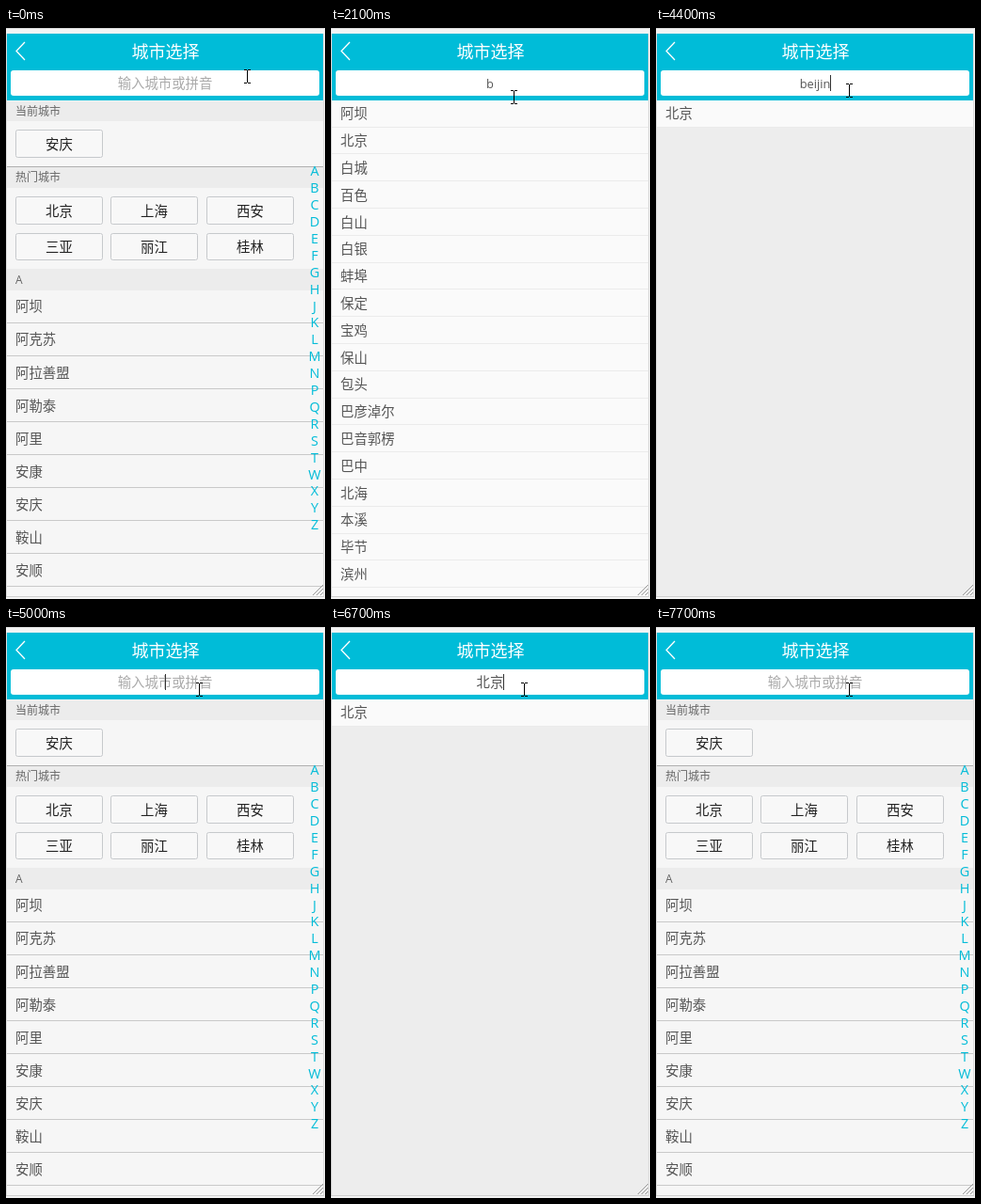
Animation, 339 px wide and 607 px high, one loop 8000 ms. Source, as an HTML page:

```html
<!DOCTYPE html>
<html lang="zh-CN">
<head>
<meta charset="utf-8">
<title>城市选择</title>
<style>
html, body { margin: 0; width: 100%; height: 100%; overflow: hidden; background: #f4f4f4; }
svg { display: block; width: 339px; height: 607px; }
text { font-family: "Open Sans", "Noto Sans CJK SC", "Noto Sans CJK", sans-serif; white-space: pre; }
.pinyin { font-family: "Liberation Sans", Arial, sans-serif; font-weight: bold; }
.pick { font-family: "Noto Sans Mono CJK SC", "Noto Sans CJK SC", "Noto Sans CJK", sans-serif; font-weight: 300; }
</style>
</head>
<body>
<svg id="stage" viewBox="0 0 339 607"></svg>
<script>
const LOOP = 8000, TICK = 100, CYAN = '#00bcd8';
const stage = document.getElementById('stage');

// Search results by query
const B_LIST = '阿坝 北京 白城 百色 白山 白银 蚌埠 保定 宝鸡 保山 包头 巴彦淖尔 巴音郭楞 巴中 北海 本溪 毕节 滨州';
const RESULTS = {
  b: B_LIST,
  be: '北京 北海 本溪 海北 淮北 呼伦贝尔',
  bei: '北京 北海 海北 淮北 呼伦贝尔',
  '北': '北京 北海 海北 淮北'
};

// time, query, caret shown, input method text, candidates
const STATES = [
  [0, '', 0], [300, '', 1],
  [800, 'b', 0], [1300, 'b', 1], [1800, 'b', 0], [2300, 'b', 1], [2800, 'b', 0],
  [3000, 'be', 0], [3100, 'be', 1], [3300, 'bei', 1],
  [3700, 'beij', 1], [3800, 'beiji', 0], [3900, 'beijin', 0], [4000, 'beijing', 0],
  [4300, 'beijing', 1], [4400, 'beijin', 1],
  [4800, 'beij', 0], [4900, 'bei', 0], [5000, '', 1], [5200, '', 0],
  [5600, '', 0, 'b', '不 吧 被 把'],
  [5700, '', 1, 'be', '被 呗 本 笨'],
  [5900, '', 1, 'bei', '被 北 背 倍'],
  [6100, '', 1, "bei'j", '北京 背景 背脊'],
  [6200, '', 0, "bei'ji", '背脊 北极 背级'],
  [6300, '', 0, "bei'jin", '北京 背筋 北进'],
  [6400, '', 0, "bei'jing", '北京 背景 背静'],
  [6600, '北京', 0], [6700, '北京', 1],
  [7100, '北', 1], [7200, '北', 0], [7300, '', 1], [7700, '', 0]
];

// time, x, y of the pointer
const PATH = [
  [0, 256, 51], [400, 201, 59], [1200, 201, 59], [1400, 154, 99],
  [1700, 154, 99], [2100, 194, 72.5], [2600, 194, 72.5], [2800, 205, 66], [LOOP, 205, 66]
];

const rect = (x, y, w, h, fill, extra = '') =>
  `<rect x="${x}" y="${y}" width="${w}" height="${h}" fill="${fill}" ${extra}/>`;
const path = (d, stroke, width = 1, fill = 'none') =>
  `<path d="${d}" stroke="${stroke}" stroke-width="${width}" fill="${fill}"/>`;
const rule = (y, color, x = 1) => path(`M${x} ${y}H338`, color);
// y is the middle of the line of text
const label = (s, x, y, size, fill, extra = '') =>
  `<text x="${x}" y="${y + size * 0.37}" font-size="${size}" fill="${fill}" ${extra}>${s}</text>`;
const MID = 'text-anchor="middle"';

const section = (s, y, h) => rect(1, y, 336, h, '#ececec') + label(s, 10, y + h / 2, 12, '#666');
const button = (s, x, y, h) =>
  rect(x + 0.5, y + 0.5, 92, h, '#f8f8f8', 'rx="2" stroke="#c6c9cc"') +
  label(s, x + 46.5, y + h / 2 + 1, 14.4, '#222', MID);

function home() {
  let out = rect(1, 77, 336, 527, '#f6f6f6') + section('当前城市', 78, 21) +
    button('安庆', 10, 108, 29) + section('热门城市', 148, 22) + rule(147.5, '#b0b0b0');
  [['北京', '上海', '西安'], ['三亚', '丽江', '桂林']].forEach((row, j) =>
    row.forEach((s, i) => out += button(s, [10, 111, 213][i], 179 + 39 * j, 29 - j)));
  out += section('A', 256, 23);
  '阿坝 阿克苏 阿拉善盟 阿勒泰 阿里 安康 安庆 鞍山 安顺'.split(' ').forEach((s, i) => {
    out += label(s, 10, 296 + 35.1 * i, 14.4, '#555') + rule(Math.floor(313 + 35.1 * i) + 0.5, '#c9c9c9');
  });
  [...'ABCDEFGHJKLMNPQRSTWXYZ'].forEach((c, i) =>
    out += label(c, 328, 152 + 17.9 * i, 14.4, CYAN, MID));
  return out;
}

function results(query) {
  const rows = (RESULTS[query] || '北京').split(' ');
  const height = Math.min(527, 28.8 * rows.length + (rows.length > 17 ? 29 : 0));
  let out = rect(1, 77, 336, 527, '#ededed') + rect(1, 77, 336, Math.round(height), '#fafafa');
  rows.forEach((s, i) => {
    out += label(s, 10, 91 + 28.8 * i, 14.4, '#555') + rule(Math.floor(105 + 28.8 * i) + 0.5, '#ebebeb');
  });
  return out;
}

function textWidth(s) {
  const probe = document.createElementNS('http://www.w3.org/2000/svg', 'text');
  probe.setAttribute('font-size', /[a-z]/.test(s) ? 12.8 : 14.4);
  probe.textContent = s;
  stage.append(probe);
  return probe.getComputedTextLength();
}

function header(query, caret) {
  const caretX = Math.floor(169 + (query ? textWidth(query) / 2 : 0)) + 0.5;
  return rect(1, 6, 336, 71, CYAN) + path('M20 15L11 24.5L20 34', '#fff', 1.3) +
    label('城市选择', 169.5, 25.5, 18, '#fff', MID) + rect(5, 45, 328, 27, '#fff', 'rx="3"') +
    (query ? label(query, 169, 59, /[a-z]/.test(query) ? 12.8 : 14.4, '#555', MID)
           : label('输入城市或拼音', 169, 59, 14.4, '#aaa', MID)) +
    (caret ? path(`M${caretX} 50V67`, '#333') : '');
}

const frame = () =>
  rule(0.5, '#dcdcdc', 0) + path('M.5 6V604M337.5 6V604', '#dcdcdc') + rule(604.5, '#cfcfcf', 0) +
  path('M326 603L337 592M330 603L337 596M334 603L337 600', '#999');

function popup(typed, picks) {
  const advance = { b: 9.8, e: 8.9, i: 4.45, j: 4.45, "'": 3.8, n: 9.8, g: 9.8 };
  const end = [...typed].reduce((x, c) => x + advance[c], 179.5);
  let x = 179;
  let out = rect(168.5, 67.5, 180, 55, '#fff', 'stroke="#a9b0b6"') + path('M169 94.5H339', '#dde3e8') +
    label(typed, 179, 81.5, 16, '#0b5cc0', 'class="pinyin"') +
    path(`M${Math.floor(end) + 0.5} 73V91`, '#e00');
  picks.split(' ').forEach((s, i) => {
    const put = (c, dx) => label(c, x + dx, 108.5, 16, i ? '#0a78d0' : '#e00000', 'class="pick"');
    out += put(i + 1, 0) + put('.', 8) + put(s, 16);
    x += 16 * s.length + 29;
  });
  return out;
}

function pointer(t) {
  const k = PATH.findIndex(p => p[0] > t);
  const [t0, x0, y0] = PATH[k - 1], [t1, x1, y1] = PATH[k];
  const u = (t - t0) / (t1 - t0);
  const x = Math.round(x0 + (x1 - x0) * u), y = Math.round(y0 + (y1 - y0) * u);
  return `<g transform="translate(${x} ${y})">` + (y > 77
    ? path('M.5 .5V16L4 12.5L6.5 18L9 17L6.5 11.5H11.5Z', '#000', 1, '#fff')
    : path('M-3 -6.5H0M1 -6.5H4M.5 -6V7M-3 7.5H0M1 7.5H4', '#000')) + '</g>';
}

let shown = -1;
function draw(now) {
  const t = Math.floor(now % LOOP / TICK) * TICK;
  if (t !== shown) {
    shown = t;
    const [, query, caret, typed, picks] = STATES.filter(s => s[0] <= t).pop();
    stage.innerHTML = (query ? results(query) : home()) + header(query, caret) + frame() +
      (typed ? popup(typed, picks) : '') + pointer(t);
  }
  requestAnimationFrame(() => draw(performance.now() - start));
}
const start = performance.now();
draw(0);
</script>
</body>
</html>
```
